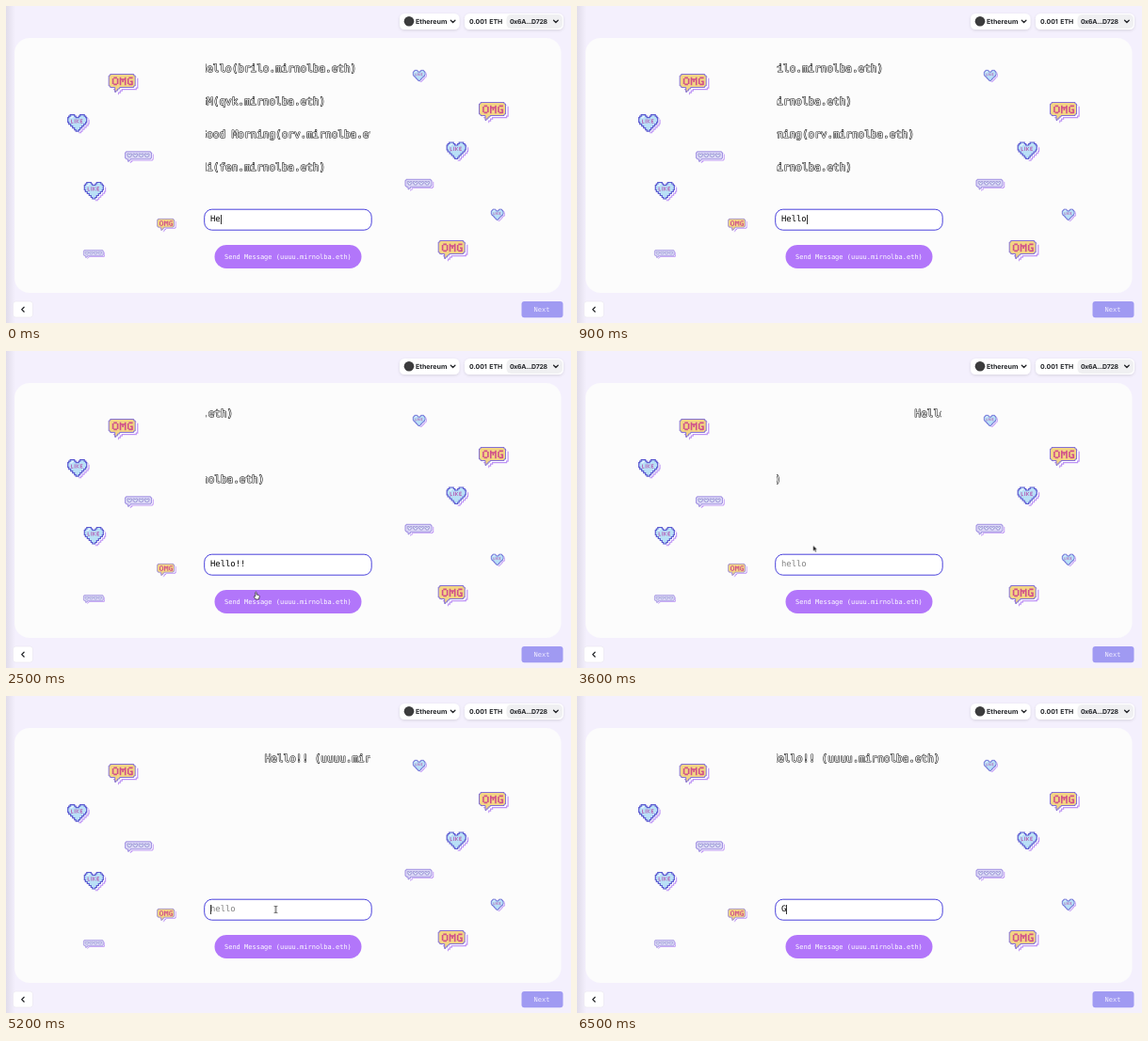
Recreate the animation shown at these times as an HTML page. Size 600x337 px, loop 6.6 s.

```html
<!DOCTYPE html>
<html lang="en">
<head>
<meta charset="utf-8">
<title>Message wall</title>
<style>
  html, body { margin: 0; width: 100%; height: 100%; overflow: hidden; background: #f4f0fd; }
  svg { position: absolute; left: 0; top: 0; width: 600px; height: 337px; }
  text, .field { font-family: "DejaVu Sans Mono", monospace; text-rendering: geometricPrecision; }
  .ui { font: 700 7.1px Inter, sans-serif; fill: #24262a; }
  .chevron { fill: none; stroke: #24262a; stroke-width: 1.3; stroke-linecap: round; stroke-linejoin: round; }
  .small { font-size: 7px; text-anchor: middle; }
  .line { font-size: 11px; fill: #fff; stroke: #222; stroke-width: 1.15; stroke-linejoin: round; paint-order: stroke; white-space: pre; }

  .marquee { animation: scroll 6.6s steps(66) infinite; }
  @keyframes scroll { to { transform: translateX(-345.8px); } }

  .field {
    position: absolute; left: 217px; top: 222px; height: 10px;
    font-size: 8.9px; line-height: 10px; white-space: pre; overflow: hidden; color: #000;
  }
  .typed { border-right: 1px solid #333; animation: type 6.6s step-end infinite, caret 6.6s step-end infinite; }
  .hint { color: #808080; animation: hint 6.6s step-end infinite; }
  .next-word { width: 1ch; border-right: 1px solid #333; animation: next-word 6.6s step-end infinite; }
  @keyframes type {
    0% { width: 2ch; }
    3.03% { width: 3ch; }
    4.54% { width: 4ch; }
    7.57% { width: 5ch; }
    18.18% { width: 6ch; }
    21.21% { width: 7ch; }
    45.45%, 100% { width: 0; }
  }
  @keyframes caret {
    0% { border-color: #333; }
    25.75% { border-color: #aaa; }
    27.27% { border-color: transparent; }
    69.69% { border-color: #333; }
    80.3% { border-color: transparent; }
    87.87% { border-color: #333; }
    95.45%, 100% { border-color: transparent; }
  }
  @keyframes hint { 0% { opacity: 0; } 45.45% { opacity: 1; } 95.45%, 100% { opacity: 0; } }
  @keyframes next-word { 0% { opacity: 0; } 95.45%, 100% { opacity: 1; } }

  .mouse { animation: move 6.6s step-end infinite; }
  .beam { animation: beam 6.6s step-end infinite; }
  .arrow { animation: arrow 6.6s step-end infinite; }
  .hand { animation: hand 6.6s step-end infinite; }
  @keyframes move {
    0%, 28.78% { transform: translate(286.5px, 227px); animation-timing-function: steps(5); }
    36.36% { transform: translate(266px, 256px); }
    46.96% { transform: translate(266px, 256px); animation-timing-function: steps(5); }
    54.54% { transform: translate(250.7px, 206.7px); }
    59.09% { transform: translate(250.7px, 206.7px); animation-timing-function: steps(6); }
    68.18%, 100% { transform: translate(286.5px, 227px); }
  }
  @keyframes beam {
    0%, 31.81%, 53.03%, 95.45%, 100% { opacity: 0; }
    28.78%, 50%, 63.63% { opacity: 1; }
  }
  @keyframes arrow {
    0%, 36.36%, 50%, 63.63%, 100% { opacity: 0; }
    31.81%, 48.48%, 53.03% { opacity: 1; }
  }
  @keyframes hand { 0%, 48.48%, 100% { opacity: 0; } 36.36% { opacity: 1; } }
</style>
</head>
<body>
<svg viewBox="0 0 600 337">
  <defs>
    <linearGradient id="edge">
      <stop offset="0" stop-color="#332c40" stop-opacity=".1"/>
      <stop offset="1" stop-color="#332c40" stop-opacity="0"/>
    </linearGradient>
    <filter id="lift" x="-10%" y="-40%" width="120%" height="190%">
      <feDropShadow dx="0" dy="1" stdDeviation="1.6" flood-color="#000" flood-opacity=".12"/>
    </filter>
    <clipPath id="window"><rect x="212" y="55" width="175" height="130"/></clipPath>

    <!-- Each sticker: lavender edge, white gap, then the body -->
    <path id="bubble" d="M2 .5H27V2H28.5V13H27V14.5H12V16H10V18H8V19.5H7V14.5H2V13H.5V2H2Z"/>
    <g id="omg">
      <use href="#bubble" x="3.2" y="2.7" fill="#bd93f5"/>
      <use href="#bubble" x="2" y="1.6" fill="#fff"/>
      <use href="#bubble" fill="#f3d583" stroke="#8470d4"/>
      <path d="M5.6 4.4H9.2M4.9 5V11M9.9 5V11M5.6 11.4H9.2M12.8 12.2V3.8M18 12.2V3.8M13.5 6H17.3M15.4 6V9M25.9 4.4H21.6M21 5V11M21.6 11.4H25.3M25.3 12V8.2H23.3"
        fill="none" stroke="#d0508a" stroke-width="1.6"/>
    </g>

    <path id="heart" d="M10.5 4h1.5v-1.5h1.5v-1.5h4.5v1.5h1.5v1.5h1v5h-1v2h-2v2h-2v2h-2v2h-1.5v1.5h-3v-1.5h-1.5v-2h-2v-2h-2v-2h-2v-2h-1v-5h1v-1.5h1.5v-1.5h4.5v1.5h1.5v1.5z"/>
    <g id="like">
      <use href="#heart" x="2.9" y="2.2" fill="#bd93f5"/>
      <use href="#heart" x="1.8" y="1.2" fill="#fff"/>
      <use href="#heart" fill="#b9e0f6" stroke="#5b58d0" stroke-width="1.2"/>
      <path d="M3 4.2H5V2.8H7" fill="none" stroke="#edf9ff"/>
      <path d="M4.3 6V9.7H6.2M7.9 5.7V10M9.8 5.7V10M12.3 6L10.4 7.9L12.3 9.8M16.2 6.1H14V9.6H16.2M14 7.9H15.8"
        fill="none" stroke="#b565b8" stroke-width=".9"/>
    </g>

    <path id="strip" d="M1.5 .5H27.5V1.5H28.5V7.5H27.5V8.5H6V10H4.5V11H3.5V8.5H1.5V7.5H.5V1.5H1.5Z"/>
    <path id="dot" d="M0 0H1.6V1H3V0H4.6V2.2H3.5V3.6H1.1V2.2H0Z" fill="#eaf2fc" stroke="#8f86cf" stroke-width=".7"/>
    <g id="hearts">
      <use href="#strip" x="2.2" y="1.8" fill="#bd93f5"/>
      <use href="#strip" x="1.3" y="1" fill="#fff"/>
      <use href="#strip" fill="#dcd8f6" stroke="#9a8ae0" stroke-width=".9"/>
      <use href="#dot" x="2.8" y="2.7"/>
      <use href="#dot" x="9" y="2.7"/>
      <use href="#dot" x="15.2" y="2.7"/>
      <use href="#dot" x="21.4" y="2.7"/>
    </g>
  </defs>

  <rect width="600" height="337" fill="#f4f0fd"/>
  <rect x="9" y="34" width="580.5" height="271" rx="16" fill="#fcfcfc"/>
  <rect width="10" height="337" fill="url(#edge)"/>

  <!-- Wallet bar -->
  <g filter="url(#lift)">
    <rect x="418" y="8" width="63.5" height="17" rx="5.5" fill="#fff"/>
    <rect x="487" y="8" width="105" height="17" rx="5.5" fill="#fff"/>
  </g>
  <rect x="531.5" y="9" width="59.5" height="15" rx="5" fill="#f0f0f2"/>
  <circle cx="428" cy="16.3" r="5.3" fill="#3c3c3d"/>
  <text class="ui" x="435" y="18.9">Ethereum</text>
  <text class="ui" x="492" y="18.9" style="font-size:6.9px;word-spacing:.8px">0.001 ETH</text>
  <text class="ui" x="535" y="18.9" style="font-size:6.9px;letter-spacing:-.3px">0x6A...D728</text>
  <path class="chevron" d="M472.3 15.2l2.3 2.3 2.3-2.3M581.6 15.2l2.3 2.3 2.3-2.3"/>

  <!-- Stickers -->
  <use href="#omg" x="108.7" y="72"/>
  <use href="#omg" x="502" y="102"/>
  <use href="#omg" x="458.7" y="249"/>
  <use href="#omg" transform="translate(160.3 226) scale(.64)"/>
  <use href="#like" x="65.2" y="114.6"/>
  <use href="#like" x="467.7" y="144"/>
  <use href="#like" x="82.8" y="186.5"/>
  <use href="#like" transform="translate(432 67.7) scale(.64)"/>
  <use href="#like" transform="translate(515 215.5) scale(.64)"/>
  <use href="#hearts" x="126" y="154.3"/>
  <use href="#hearts" x="423.5" y="183.8"/>
  <use href="#hearts" transform="translate(82 259.2) scale(.75)"/>

  <!-- Messages -->
  <g clip-path="url(#window)">
    <g class="marquee">
      <text class="line" x="206.6" y="70">Hello(brilo.mirnolba.eth)</text>
      <text class="line" x="206.6" y="105">GM(qvk.mirnolba.eth)</text>
      <text class="line" x="206.6" y="140">Good Morning(orv.mirnolba.eth)</text>
      <text class="line" x="206.6" y="175">Hi(fen.mirnolba.eth)</text>
      <text class="line" x="547.2" y="70">Hello!! (uuuu.mirnolba.eth)</text>
    </g>
  </g>

  <!-- Form and navigation -->
  <rect x="210.7" y="216.2" width="177.5" height="22" rx="8" fill="#fff" stroke="#4a42dc"/>
  <rect x="221.5" y="254" width="156" height="25" rx="12.5" fill="#b276fa"/>
  <text class="small" x="299.4" y="269" fill="#fff">Send Message (uuuu.mirnolba.eth)</text>
  <rect x="7.5" y="314" width="21" height="17" rx="3" fill="#fff" stroke="#e8e4ee" stroke-width=".6"/>
  <path class="chevron" d="M19.1 320.2l-2.4 2.4 2.4 2.4"/>
  <rect x="547.5" y="314" width="44" height="17.3" rx="3" fill="#a09af2"/>
  <text class="small" x="569" y="325" fill="#f0ecff">Next</text>
</svg>

<div class="field hint">hello</div>
<div class="field typed">Hello!!</div>
<div class="field next-word">G</div>

<svg viewBox="0 0 600 337">
  <g class="mouse">
    <path class="beam" d="M-1.6-3.6Q0-3.6 0-2.6Q0-3.6 1.6-3.6M0-2.6V2.6M-1.6 3.6Q0 3.6 0 2.6Q0 3.6 1.6 3.6" fill="none" stroke="#222" stroke-width=".9"/>
    <path class="arrow" d="M0 0V6L1.4 4.7 2.4 7 3.5 6.5 2.5 4.3H4.3Z" fill="#111" stroke="#fff" stroke-width=".4"/>
    <path class="hand" d="M-1.2 .6Q-.6-.4 .1 .6V3L2.6 3.6Q3.4 4 3.1 5.2L2.5 8H-.9L-2.8 5.2Q-2.8 4.2-1.2 5Z" fill="#fff" stroke="#222" stroke-width=".7" stroke-linejoin="round"/>
  </g>
</svg>
</body>
</html>
```
